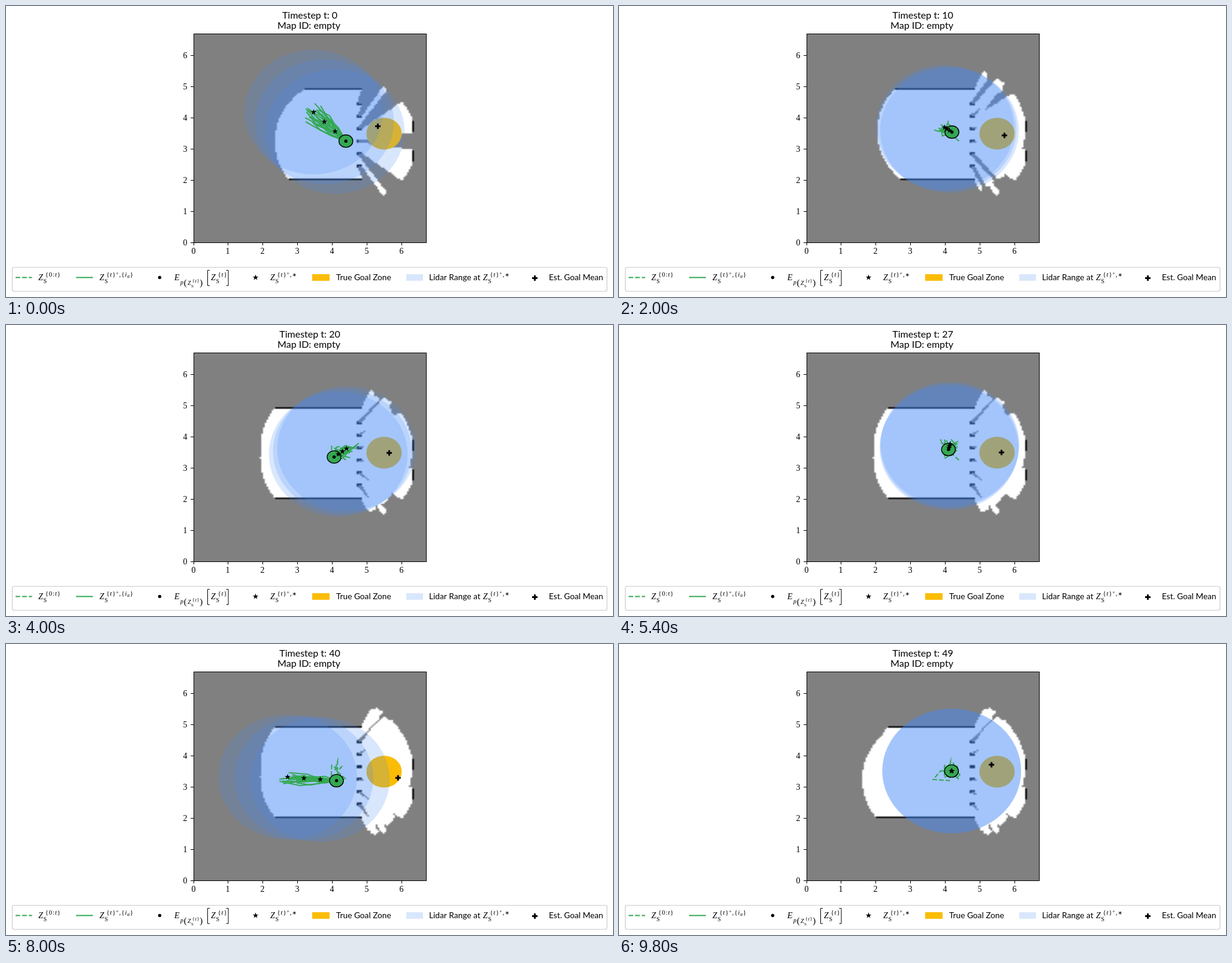
Write an HTML page with a canvas that moves like this. It is 1013x485 px and loops after 10000 ms.

```html
<!DOCTYPE html>
<html lang="en">
<head>
<meta charset="utf-8">
<title>Lidar exploration</title>
<style>
html, body { margin: 0; width: 100%; height: 100%; overflow: hidden; background: #fff; }
canvas { display: block; }
</style>
</head>
<body>
<canvas id="stage" width="1013" height="485"></canvas>
<script>
const ctx = document.getElementById('stage').getContext('2d');
const STEPS = 50, STEP_MS = 200;
const SIZE = 6.7, CELLS = 134, LIDAR = 2.04;
const GREEN = '#34a853', BLUE = 'rgba(66,133,244,.2)', YELLOW = '#fbbc05';
const SANS = 'Lato, "Open Sans", sans-serif', SERIF = '"Liberation Serif", serif';
const DASH = [7.7, 3.3];
const X = x => 313 + x * 388 / SIZE, Y = y => 394 - y * 348 / SIZE;
const crisp = v => Math.floor(v) + .5;

// Robot waypoints: step, x, y
const route = [
  [0, 4.39, 3.25], [1, 4.08, 3.56], [4, 4.26, 3.64], [10, 4.19, 3.54],
  [13, 3.98, 3.69], [17, 3.97, 3.3], [20, 4.05, 3.35], [21, 4.17, 3.44],
  [27, 4.09, 3.59], [31, 4.15, 3.82], [35, 4.14, 3.51], [36, 4.14, 3.39],
  [40, 4.12, 3.2], [41, 3.65, 3.24], [42, 3.87, 3.52], [43, 4.16, 3.5],
  [50, 4.18, 3.51]
];

function positionAt(t) {
  const i = Math.max(1, route.findIndex(p => p[0] >= t));
  const [t0, x0, y0] = route[i - 1], [t1, x1, y1] = route[i];
  const f = (t - t0) / (t1 - t0);
  return { x: x0 + (x1 - x0) * f, y: y0 + (y1 - y0) * f };
}
const path = Array.from({ length: STEPS + 1 }, (_, t) => positionAt(t));

// The goal estimate drifts diagonally around the true goal
function goalAt(t) {
  const a = t / STEPS * 2 * Math.PI;
  const drift = .18 - .13 * Math.cos(a) - .22 * Math.cos(2 * a) - .1 * Math.sin(a);
  return { x: 5.48 + drift, y: 3.6 - .75 * drift };
}

function isWall(i, j) {
  if (i === 126) return true;
  if (i > 96) return false;
  if (j === 98 || j === 40) return true;
  return i > 93 && j >= 48 && j <= 90 && j % 8 < 2;
}

// Step at which each cell is first seen by the lidar
const seen = new Uint8Array(CELLS * CELLS).fill(255);
path.forEach(({ x, y }, t) => {
  for (let n = 0; n < 720; n++) {
    const c = Math.cos(n * Math.PI / 360), s = Math.sin(n * Math.PI / 360);
    for (let r = 0; r < LIDAR; r += .02) {
      const i = Math.floor((x + r * c) * 20), j = Math.floor((y + r * s) * 20);
      const cell = j * CELLS + i;
      if (seen[cell] > t) seen[cell] = t;
      if (isWall(i, j)) break;
    }
  }
});

const map = document.createElement('canvas');
map.width = map.height = CELLS;
const mapCtx = map.getContext('2d');

function drawMap(t) {
  mapCtx.fillStyle = '#808080';
  mapCtx.fillRect(0, 0, CELLS, CELLS);
  seen.forEach((step, cell) => {
    if (step > t) return;
    const i = cell % CELLS, j = Math.floor(cell / CELLS);
    mapCtx.fillStyle = isWall(i, j) ? '#000' : '#fff';
    mapCtx.fillRect(i, CELLS - 1 - j, 1, 1);
  });
  ctx.drawImage(map, 313, 46, 388, 348);
}

function randomFrom(seed) {
  return () => {
    seed = (seed * 16807) % 2147483647;
    return seed / 2147483647;
  };
}

function text(str, x, y, font, align = 'left') {
  ctx.font = font;
  ctx.textAlign = align;
  ctx.fillStyle = '#000';
  ctx.fillText(str, x, y);
}

function disc(x, y, r, fill, stroke) {
  ctx.beginPath();
  ctx.ellipse(X(x), Y(y), r * 388 / SIZE, r * 348 / SIZE, 0, 0, 7);
  ctx.fillStyle = fill;
  ctx.fill();
  if (!stroke) return;
  ctx.strokeStyle = stroke;
  ctx.lineWidth = 1.4;
  ctx.stroke();
}

function dot(x, y) {
  ctx.beginPath();
  ctx.arc(x, y, 2.7, 0, 7);
  ctx.fillStyle = '#000';
  ctx.fill();
}

function star(x, y) {
  ctx.beginPath();
  for (let k = 0; k < 10; k++) {
    const r = k % 2 ? 2 : 5, a = k * Math.PI / 5;
    ctx.lineTo(x + r * Math.sin(a), y - r * Math.cos(a));
  }
  ctx.fillStyle = '#000';
  ctx.fill();
}

function plus(x, y) {
  ctx.fillStyle = '#000';
  ctx.fillRect(x - 4.5, y - 1.5, 9, 3);
  ctx.fillRect(x - 1.5, y - 4.5, 3, 9);
}

function line(points, color, width, dash = []) {
  ctx.beginPath();
  points.forEach(([x, y]) => ctx.lineTo(x, y));
  ctx.strokeStyle = color;
  ctx.lineWidth = width;
  ctx.setLineDash(dash);
  ctx.stroke();
  ctx.setLineDash([]);
}

// Each part is [string, size, baseline]; letters are italic
function formula(x, parts) {
  ctx.letterSpacing = '.8px';
  for (const [str, size, y] of parts) {
    for (const ch of str) {
      text(ch, x, y, `${/[a-z]/.test(ch) ? 'italic ' : ''}${size}px ${SERIF}`);
      x += ctx.measureText(ch).width;
    }
  }
  ctx.letterSpacing = '0px';
}

function zTerm(x, parts) {
  text('Z', x, 457, `italic 14px ${SERIF}`);
  text('S', x + 8.5, 462, `10px ${SERIF}`);
  formula(x + 11.5, parts);
}

function bracket(x, lip) {
  line([[x + lip, 440.5], [x, 440.5], [x, 466], [x + lip, 466]], '#000', 1);
}

function drawAxes(t) {
  text('Timestep t: ' + t, 507, 21, '16px ' + SANS, 'center');
  text('Map ID: empty', 505.5, 38, '16px ' + SANS, 'center');
  for (let n = 0; n <= 6; n++) {
    const x = crisp(X(n)), y = crisp(Y(n));
    line([[x, 394], [x, 399]], '#000', 1);
    line([[313, y], [308, y]], '#000', 1);
    text(n, x - .5, 413, '14px ' + SERIF, 'center');
    text(n, 302.5, y + 4.5, '14px ' + SERIF, 'right');
  }
  ctx.strokeStyle = '#000';
  ctx.lineWidth = 1;
  ctx.strokeRect(313.5, 46.5, 388, 348);
}

function drawLegend() {
  const label = '13.7px ' + SANS;
  const future = [['{t}', 11, 451], ['+', 8, 448], [',', 11, 451]];
  const best = [...future, ['∗', 9, 451]];
  ctx.beginPath();
  ctx.roundRect(10.5, 435.5, 992.5, 40, 3);
  ctx.strokeStyle = '#ccc';
  ctx.lineWidth = 1.2;
  ctx.stroke();

  line([[16, 452.5], [43.5, 452.5]], GREEN, 2, DASH);
  zTerm(54, [['{0:t}', 11, 451]]);

  line([[117, 452.5], [145, 452.5]], GREEN, 2);
  zTerm(156, [...future, ['{i', 11, 451], ['a', 8, 453], ['}', 11, 451]]);

  dot(256.5, 452.5);
  text('E', 281, 457, `italic 14px ${SERIF}`);
  formula(291, [['p', 10, 464], ['(', 15, 466]]);
  text('Z', 303, 465, `italic 10px ${SERIF}`);
  text('S', 309, 469, `7px ${SERIF}`);
  formula(311, [['{t}', 8, 461], [')', 15, 466]]);
  bracket(336.5, 3.5);
  zTerm(342, [['{t}', 11, 451]]);
  bracket(371, -3.5);

  star(416.5, 452.5);
  zTerm(441, best);

  ctx.fillStyle = YELLOW;
  ctx.fillRect(511, 447, 29, 11);
  text('True Goal Zone', 551, 457, label);

  ctx.fillStyle = BLUE;
  ctx.fillRect(668, 447, 28, 11);
  text('Lidar Range at', 706, 457, label);
  zTerm(796, best);

  plus(882.5, 453.5);
  text('Est. Goal Mean', 906, 457, label);
}

function drawRobot(t) {
  const { x, y } = path[t], next = path[t + 1], goal = goalAt(t);
  const dx = next.x - x, dy = next.y - y;
  const plan = [1, 2, 3].map(k => [x + dx * k, y + dy * k]);
  disc(5.49, 3.49, .51, YELLOW);
  plan.forEach(([px, py]) => disc(px, py, 2, BLUE));

  // Sampled futures: the planned step plus noise
  const random = randomFrom(977 * (t + 1));
  const noise = () => (random() - .5) * .28;
  for (let n = 0; n < 20; n++) {
    let sx = x, sy = y;
    const points = [[X(sx), Y(sy)]];
    for (let k = 0; k < 3; k++) {
      sx += dx + noise();
      sy += dy + noise();
      points.push([X(sx), Y(sy)]);
    }
    line(points, GREEN, 2);
  }
  line(path.slice(0, t + 1).map(p => [X(p.x), Y(p.y)]), GREEN, 2, DASH);

  disc(x, y, .2, GREEN, '#000');
  dot(X(x), Y(y));
  plan.forEach(([px, py]) => star(X(px), Y(py)));
  plus(X(goal.x), Y(goal.y));
}

let shown = -1;
function frame() {
  const t = Math.floor(performance.now() / STEP_MS) % STEPS;
  if (t !== shown) {
    shown = t;
    ctx.fillStyle = '#fff';
    ctx.fillRect(0, 0, 1013, 485);
    drawMap(t);
    drawRobot(t);
    drawAxes(t);
    drawLegend();
  }
  requestAnimationFrame(frame);
}
frame();
</script>
</body>
</html>
```
